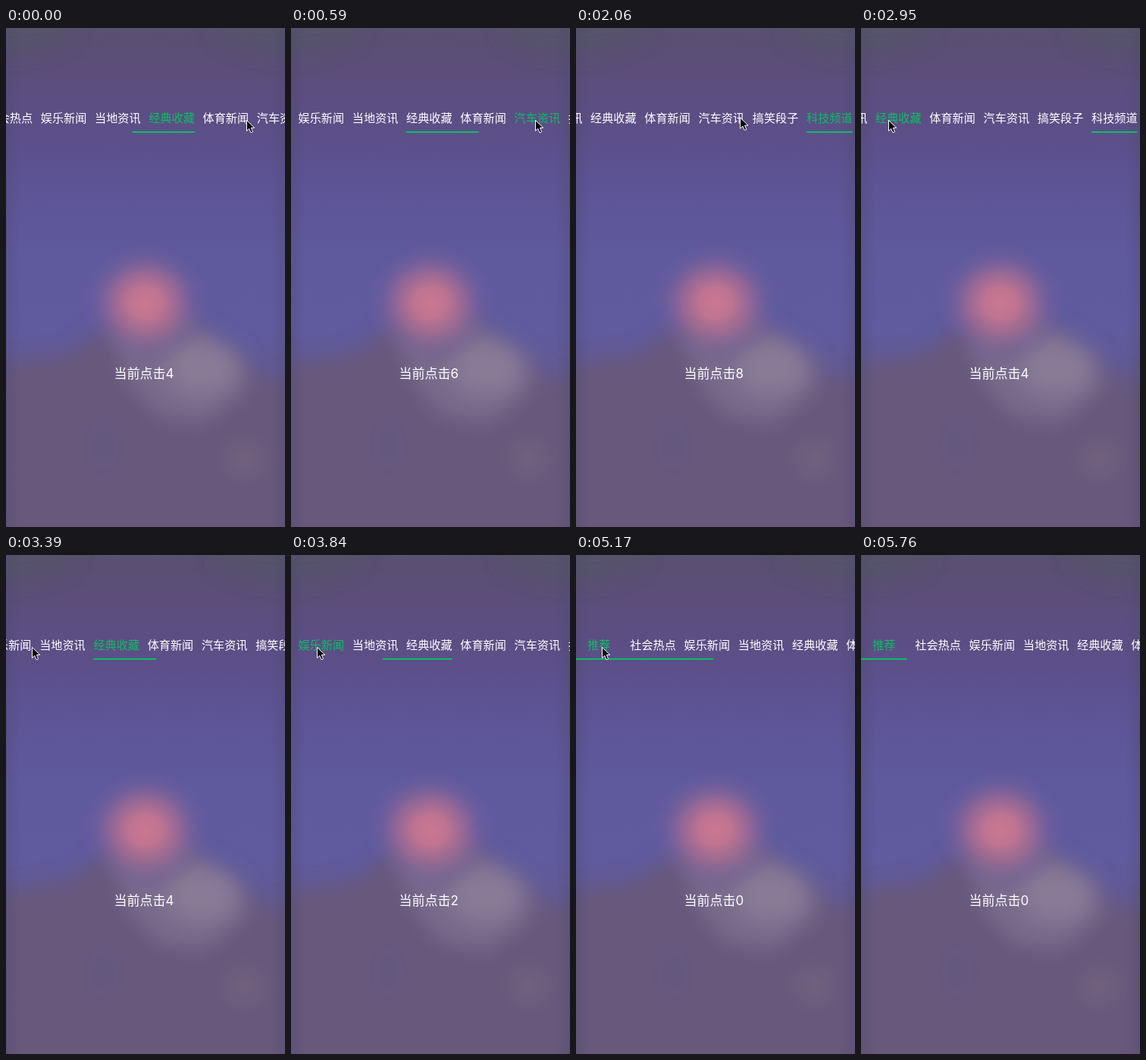
Recreate the animation shown at these times as an HTML page. Size 368 px wide and 657 px high, loop 6340 ms.

```html
<!DOCTYPE html>
<html lang="zh-CN">
<head>
<meta charset="utf-8">
<title>Tabs</title>
<style>
  html, body { margin: 0; width: 100%; height: 100%; overflow: hidden; background: #5d5088; }
  svg { display: block; width: 368px; height: 657px; }
  text { font-family: Inter, "Noto Sans CJK SC", "Noto Sans CJK", sans-serif; fill: #fff; }
  .tab { font-size: 15.15px; text-anchor: middle; }
  .tab.on, #bar { fill: #07c160; }
  #label { font-size: 17px; }
</style>
</head>
<body>
<svg viewBox="0 0 368 657">
  <defs>
    <linearGradient id="sky" x2="0" y2="1">
      <stop offset="0" stop-color="#59506f"/>
      <stop offset=".08" stop-color="#5c4e79"/>
      <stop offset=".18" stop-color="#5c4e85"/>
      <stop offset=".3" stop-color="#5d5394"/>
      <stop offset=".46" stop-color="#5f5a9e"/>
      <stop offset=".6" stop-color="#605b9f"/>
      <stop offset=".72" stop-color="#635a91"/>
      <stop offset="1" stop-color="#65597c"/>
    </linearGradient>
    <linearGradient id="sides">
      <stop offset="0" stop-color="#4c4a6c" stop-opacity=".35"/>
      <stop offset=".05" stop-color="#4c4a6c" stop-opacity="0"/>
      <stop offset=".95" stop-color="#4c4a6c" stop-opacity="0"/>
      <stop offset="1" stop-color="#4c4a6c" stop-opacity=".35"/>
    </linearGradient>
    <radialGradient id="glow">
      <stop offset="0" stop-color="#cb7890"/>
      <stop offset=".25" stop-color="#c37590" stop-opacity=".95"/>
      <stop offset=".5" stop-color="#a66c93" stop-opacity=".75"/>
      <stop offset=".75" stop-color="#7e6299" stop-opacity=".4"/>
      <stop offset="1" stop-color="#655b9e" stop-opacity="0"/>
    </radialGradient>
    <filter id="soft" x="-50%" y="-50%" width="200%" height="200%"><feGaussianBlur stdDeviation="13"/></filter>
  </defs>
  <rect width="368" height="657" fill="url(#sky)"/>
  <g filter="url(#soft)">
    <path d="M-40 452 40 436 85 430 130 392 235 378 300 425 335 462 410 462V700H-40Z" fill="#67597c"/>
    <path d="M138 402 232 380 312 430 318 475 260 520 200 510 165 470Z" fill="#7d6f90" opacity=".85"/>
    <ellipse cx="258" cy="448" rx="46" ry="35" fill="#8c7d98" opacity=".85"/>
    <ellipse cx="314" cy="567" rx="24" ry="24" fill="#75647e" opacity=".7"/>
    <ellipse cx="128" cy="550" rx="14" ry="34" fill="#625a86" opacity=".6"/>
    <ellipse cx="0" cy="0" rx="90" ry="34" fill="#54546a" opacity=".7"/>
    <ellipse cx="368" cy="0" rx="90" ry="34" fill="#54546a" opacity=".7"/>
  </g>
  <ellipse cx="184" cy="362" rx="88" ry="82" fill="url(#glow)"/>
  <rect width="368" height="657" fill="url(#sides)"/>
  <g id="strip"><rect id="bar" y="136" height="2"/></g>
  <text id="label" x="142.5" y="461"></text>
  <path id="cursor" d="M.5.5V14.6L3.8 11.5 6 16.8 8.6 15.7 6.3 10.5H10.8Z" fill="#000" stroke="#fff" stroke-width="1" stroke-linejoin="round"/>
</svg>
<script>
const LOOP = 6340, TICK = 147.67, PITCH = 71.25, WIDTH = 60.6, MAX_SCROLL = 266;
const NAMES = ['推荐', '社会热点', '娱乐新闻', '当地资讯', '经典收藏', '体育新闻', '汽车资讯', '搞笑段子', '科技频道'];

// [time, tab]
const CLICKS = [[-9999, 0], [-447, 4], [510, 6], [1300, 8], [2950, 4], [3764, 2], [4860, 0]];

// [time, x, y]
const POINTER = [
  [0, 317, 121], [150, 317, 121], [590, 322, 121], [740, 322, 121], [1180, 329, 121],
  [1900, 329, 121], [2360, 19, 112], [2510, 30, 118], [2655, 36, 121], [3100, 36, 121],
  [3390, 34, 121], [5180, 34, 121], [5620, -20, 200], [LOOP, -20, 200]
];

const $ = id => document.getElementById(id);
const strip = $('strip'), bar = $('bar'), label = $('label'), cursor = $('cursor');
const clamp = (v, lo, hi) => Math.min(hi, Math.max(lo, v));
const mix = (a, b, p) => a + (b - a) * p;
const ease = p => { p = clamp(p, 0, 1); return p * p * (3 - 2 * p); };
const scrollFor = tab => clamp(tab * PITCH + WIDTH / 2 - 182.3, 0, MAX_SCROLL);

const tabs = NAMES.map((name, i) => {
  const el = document.createElementNS('http://www.w3.org/2000/svg', 'text');
  el.textContent = name;
  el.setAttribute('x', i * PITCH + WIDTH / 2);
  el.setAttribute('y', 124);
  strip.appendChild(el);
  return el;
});

function pointerAt(t) {
  const i = Math.max(1, POINTER.findIndex(p => p[0] >= t));
  const [t0, x0, y0] = POINTER[i - 1], [t1, x1, y1] = POINTER[i];
  const p = clamp((t - t0) / (t1 - t0), 0, 1);
  return [mix(x0, x1, p), mix(y0, y1, p)];
}

function draw(time) {
  const t = Math.min(LOOP, Math.floor((time % LOOP + 9) / TICK) * TICK);
  let i = CLICKS.length - 1;
  while (CLICKS[i][0] > t) i--;
  const [start, tab] = CLICKS[i], from = CLICKS[Math.max(0, i - 1)][1];

  // The leading edge stretches first, then the trailing edge and the strip follow.
  const age = t - start;
  const lead = mix(from, tab, ease(age / 250)) * PITCH;
  const lag = mix(from, tab, ease((age - 250) / 237)) * PITCH;
  const scroll = mix(scrollFor(from), scrollFor(tab), ease((age - 250) / 300));

  bar.setAttribute('x', Math.min(lead, lag));
  bar.setAttribute('width', Math.abs(lead - lag) + WIDTH);
  strip.setAttribute('transform', `translate(${-scroll} 0)`);
  tabs.forEach((el, n) => el.setAttribute('class', n === tab ? 'tab on' : 'tab'));
  label.textContent = '当前点击' + tab;
  cursor.setAttribute('transform', `translate(${pointerAt(t).join(' ')})`);
}

const begin = performance.now();
function frame() {
  draw(performance.now() - begin);
  requestAnimationFrame(frame);
}
frame();
</script>
</body>
</html>
```
